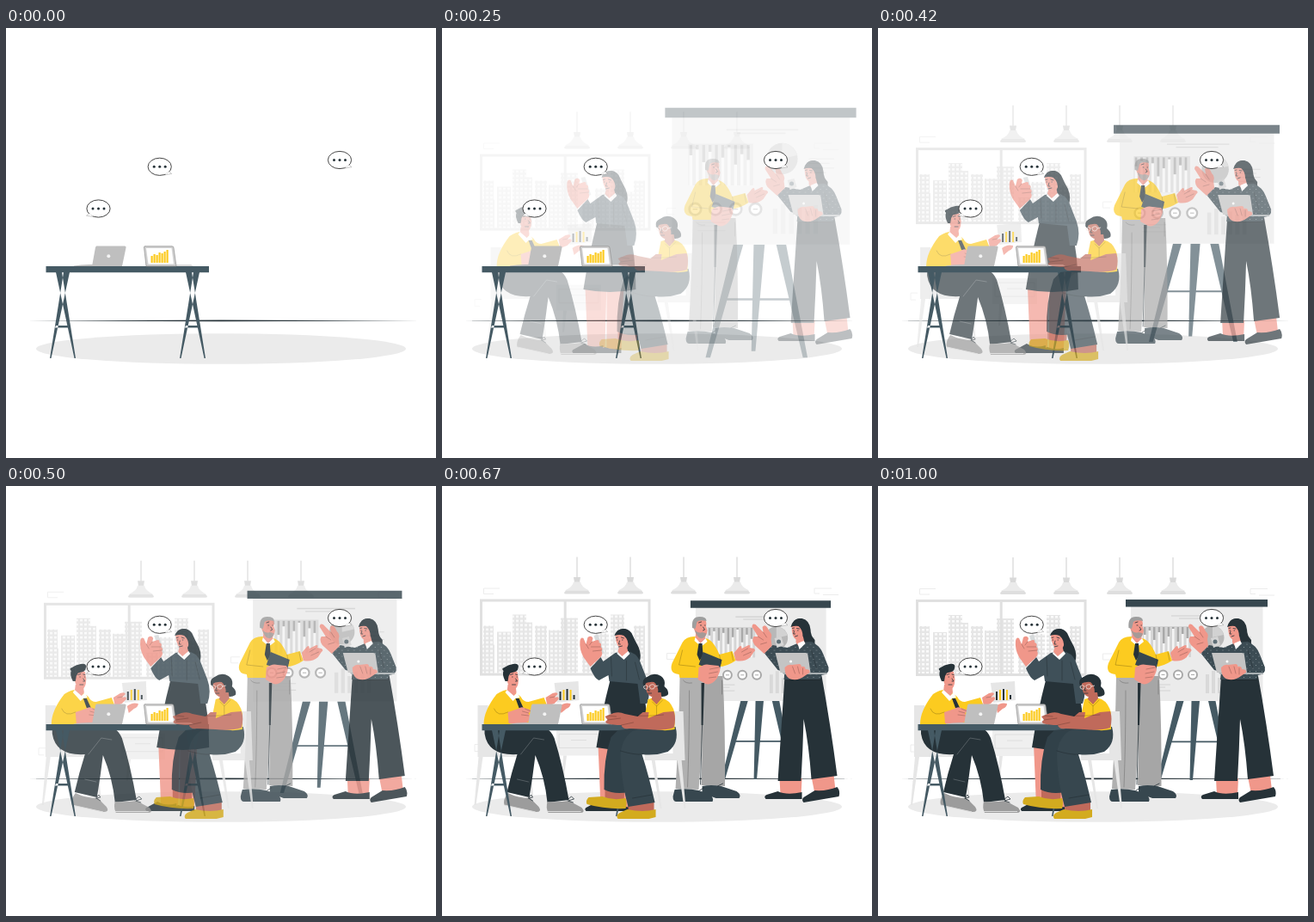
Write an HTML page that moves like this. It is 500 px wide and 500 px high and loops after 1.04 s.

```html
<!DOCTYPE html>
<html lang="en">
<head>
<meta charset="utf-8">
<title>Team meeting</title>
<style>
html, body { margin: 0; width: 100%; height: 100%; overflow: hidden; background: #fff; }
svg { display: block; width: 100vw; height: 100vh; }
.skin { fill: #f0978a; }
.brown { fill: #c06a5b; }
.yellow { fill: #fccb20; }
.gold { fill: #d3ab1f; }
.dark { fill: #263238; }
.slate { fill: #37474f; }
.steel { fill: #455a64; }
.pale { fill: #e6e6e6; }
.white { fill: #fff; }
.line { fill: none; stroke: #263238; stroke-width: .8; stroke-linecap: round; stroke-linejoin: round; }
.soft { fill: none; stroke: #000; stroke-opacity: .3; stroke-width: .7; stroke-linecap: round; stroke-linejoin: round; }
.faint { fill: none; stroke: #ececec; }
</style>
</head>
<body>
<svg viewBox="0 0 500 500">
<defs>
  <pattern id="panes" width="5" height="5" patternUnits="userSpaceOnUse">
    <path d="M0 0H5V5H0Z" fill="#e6e6e6"/><path d="M1 1h3v2.600H1Z" fill="#fafafa"/>
  </pattern>
  <pattern id="dots" width="7" height="7" patternUnits="userSpaceOnUse">
    <path d="M0 0H7V7H0Z" fill="#3c4c54"/><circle cx="2" cy="2" r=".5" fill="#9aa6ac"/><circle cx="5.500" cy="5.500" r=".5" fill="#9aa6ac"/>
  </pattern>
  <g id="lamp">
    <path d="M-.8 83h1.600v24h-1.600Z" fill="#e0e0e0"/>
    <path d="M-4 106.500h8l-1 6h-6Z" fill="#d9d9d9"/>
    <path d="M-4 112h8q1 6 10 10h-28q9-4 10-10Z" fill="#ebebeb"/>
    <path d="M-13 122h26l2 2.500q0 1.500-2 1.500h-26q-2 0-2-1.500Z" fill="#dedede"/>
  </g>
  <g id="trestle" class="steel">
    <path d="M58 284h7L81 384h-1.500ZM74 284h-7L51 384h1.500ZM58 346h15v2.500H57Z"/>
  </g>
  <g id="bubble">
    <path d="M5.500 9.600q4.500-.7 8.500-1.400l-3-2.500" fill="#fff" stroke="#999" stroke-width=".5"/>
    <ellipse rx="13.600" ry="10.100" fill="#fff" stroke="#333" stroke-width=".9"/>
    <path d="M5.500 8.700L10.800 5.700 11.500 7 8 8.800Z" fill="#fff"/>
    <g class="dark"><circle cx="-6.500" r="1.500"/><circle r="1.500"/><circle cx="6.500" r="1.500"/></g>
  </g>
</defs>

<ellipse cx="250" cy="373" rx="215" ry="17.800" fill="#ebebeb"/>

<g data-move="up">
  <rect x="45.500" y="133.500" width="195.500" height="86" fill="#fff"/>
  <g id="city" fill="url(#panes)"></g>
  <rect x="45.500" y="133.500" width="195.500" height="86" fill="none" stroke="#e0e0e0" stroke-width="3"/>
  <path d="M141.700 133h3v87h-3Z" fill="#e0e0e0"/>
  <use href="#lamp" x="157"/><use href="#lamp" x="219"/><use href="#lamp" x="281"/><use href="#lamp" x="343"/>
  <path class="faint" d="M67 119.500H48.500V126H60M453 119.500H433V125.500h6M443 127h18M272 195H261.500v7H270M46 301H38v8h6"/>
  <path d="M133 284h52v30h-52Z" fill="#efefef"/>
  <path d="M136 289h46v16h-46ZM150 296h18" fill="none" stroke="#dedede"/>
  <path d="M141 314h4l-3 25h-2Z" fill="#e6e6e6"/>
</g>

<path class="dark" d="M25 340.400L250 339.400 480 340.400 250 341.200Z"/>

<g data-move="zoom">
  <path class="steel" d="M347 250h8.500L327 347.700h-4ZM364.500 250h9.500l-8 92h-3.500ZM384 250h8.500L411 347.700h-4ZM340 296.500h59v1.800H340Z"/>
  <path d="M294 140H447.500V250H294Z" fill="#ebebeb"/>
  <path class="slate" d="M288 132H453v8.500H288Z"/>
  <path d="M341 151h62M350 154h42" stroke="#cfcfcf" stroke-width="1.200"/>
  <path d="M308 163h56v36h-56Z" fill="#d5d5d5"/>
  <g id="bars"></g>
  <g id="rings" fill="#fff" stroke="#a8a8a8" stroke-width="2"></g>
  <circle cx="389" cy="176" r="13.500" fill="#b8b8b8"/>
  <path d="M389 176V162.500A13.500 13.500 0 0 1 402 173Z" fill="#d2d2d2"/>
  <path d="M412 176h22M412 180h18M412 184h22M412 188h15M316 231h24M316 234h18M316 238h24" stroke="#d3d3d3"/>
  <path d="M381 219h4v22h-4ZM388 215h4v26h-4ZM395 223h4v18h-4ZM402 218h4v23h-4ZM409 221h4v20h-4ZM416 216h4v25h-4Z" fill="#d9d9d9"/>
</g>

<!-- presenter in yellow -->
<g data-move="right">
  <path d="M302 221h25q3 60 2.500 128l-27.500-1q2-60 0-127Z" fill="#a6a6a6"/>
  <path d="M277 221h28q-1 70-6 132l-27-1q4-64 5-131Z" fill="#b0b0b0"/>
  <path class="dark" d="M302 229h3.500l-1.500 49h-2Z"/>
  <path class="line" d="M303 277l-2 70"/>
  <path class="soft" d="M281 226q3 4 10 3M326 226v16M288 238q0 60-2 112"/>
  <path class="slate" d="M271 353q14-2 28 1l13 5q5 4 3 8h-42q-4 0-4-6ZM303 349q10-2 22 0l18 6q6 4 3 8h-27l-16-6Z"/>
  <path class="line" d="M300 354l5-3M321 349l6-3"/>
  <path class="yellow" d="M294 175l13 2q9 2 16 19l15-4 4 11q-12 8-22 7l-3 13H277L276 219Q264 218 268 206L280 182Q284 175 294 175Z"/>
  <path class="skin" d="M296 167l9 3 2 9-6 7-6-9Z"/>
  <path class="skin" d="M292 160Q296 152 304 153 309 156 307.500 163L309 168Q308 177 302 177 294 174 292 160Z"/>
  <path d="M291.500 165Q290 152 300 152 308 152 308 157 300 155 297 158L295 166Z" fill="#9e9e9e"/>
  <path d="M294.500 167Q298 172 303 170L308 171.500Q306 178 301 177 296 175 294.500 167Z" fill="#a59a97"/>
  <path class="line" d="M301 162h1M306 162h.5M299 159l3-1M304 164l2 3-2 1"/>
  <path class="white" d="M295 176l6 7 6-6 2 4-5 4-3 1-7-6Z"/>
  <path class="dark" d="M299 183h4l1 14-4 6-3-7Z"/>
  <path class="slate" d="M304 193l22 9-3 13-24-7Z"/>
  <path class="skin" d="M299 211q7-5 13-3l10 1q3 3 1 8l-3 7q-6 8-13 6l-9-5Z"/>
  <path class="skin" d="M340 194l6-7q3-3 3 2l8-4q3 0 1 3l5 1q3 2 0 4l-4 6q-7 6-17 4Z"/>
  <path class="soft" d="M280 191l-4 17 19 2M312 213l10-2M311 218l10-2M311 223l8-1M349 193l7-4M351 197l9-4M323 196l2 11M337 193l2 10"/>
</g>

<!-- colleague with laptop -->
<g data-move="right">
  <path class="dark" d="M408 160Q411 153 419 154 428 156 429 167 429 174 434 179 435 187 427 187 421 184 418 174Z"/>
  <path class="skin" d="M393 340h26l-1 20h-24ZM430 338l26-2 2 18-24 4Z"/>
  <path class="dark" d="M399 221h43q10 55 18 116l-30 4q-3-41-9-70-1 36-3 72h-27q4-62 8-122Z"/>
  <path class="dark" d="M391 355q10 5 28 1v8h-42q-3-3 1-5ZM434 354q14 1 26-4 4 5 2 11l-41 7q-3-3 0-6Z"/>
  <path d="M385 185l17 3 14-6 14-1q10 4 14 15l6 15q1 8-8 9l-2 5h-42l1-9-8-2-16-20Z" fill="url(#dots)"/>
  <path class="skin" d="M412 174h8l2 8-7 4-3-4Z"/>
  <path class="skin" d="M407 163Q412 157 418 162L421 173Q418 180 413 179 407 177 407 163Z"/>
  <path class="dark" d="M406 164Q409 153 418 154 428 158 425 174L420 175Q420 167 415 163 411 162 406 164Z"/>
  <path class="line" d="M409 168h.6M414 168h.6M408 165.500l2-.5M413 165.500l3 .5M410 169l-1 3 2 0M411 175l3-1"/>
  <path class="white" d="M414 183l7-3 2 3-7 7Z"/>
  <path d="M387 177l8-2 3 10-8 3Z" fill="#d5d5d5"/><circle cx="392" cy="181" r="2.500" fill="#5f6f77"/>
  <path class="skin" d="M375 195L364 185Q360 179 363 175L368 175 361 164Q361 159 365 161L374 170 373 164Q376 160 379 165L381 169Q385 172 383 178L384 186Z"/>
  <path class="soft" d="M368 175l6 4M374 170l4 6M371 184l7-2M430 191l6 21M405 226l36-1"/>
  <path d="M388 194h35q3 0 3 3l3 20h-35Z" fill="#c4c4c4"/>
  <path d="M396 217h52v2h-50Z" fill="#a9b0b3"/>
  <circle cx="406" cy="204" r="1.500" fill="#fff"/>
  <path class="skin" d="M399 211q4-4 8-3l9-1q3 1 2 3 5-1 5 3 6 0 5 4l-6 4q-6 5-14 4-9-1-9-14Z"/>
  <path class="soft" d="M408 210l3 8M414 210l2 8M420 212l0 7"/>
</g>

<!-- standing woman with phone -->
<g data-move="left">
  <path class="dark" d="M203 169Q213 162 220 171 224 180 228 187 232 197 229 205L213 200 209 180Z"/>
  <path class="skin" d="M181 300h25l-2 72h-20ZM206 300h20l-3 74h-17Z"/>
  <path class="dark" d="M180 367q10 6 22 2v7l-5 2h-30q-3-3 2-5ZM204 371q10 4 19 1v6h-27q-2-3 2-4Z"/>
  <path class="dark" d="M195 226h36q9 38 9 78-30 6-61 0 6-40 16-78Z"/>
  <path d="M184 199l3 5 14-10 14-2q10 2 14 10l9 23q5 14 0 28l-8 0-3-23-33-3-1-7-11 6q-5-2-10-14Z" fill="#3f5059"/>
  <path class="skin" d="M206 185h8l2 8-7 6-5-6Z"/>
  <path class="skin" d="M201 174Q207 168 213 173L217 181Q216 191 209 190 202 187 201 174Z"/>
  <path class="dark" d="M200 174Q203 165 212 166 223 171 220 188L216 188Q217 179 211 174 206 172 200 174Z"/>
  <path class="line" d="M203 179h.6M209 179h.6M202 176.500l2-.5M208 176l3 1M206 180l-1 4 2 0M205 187l4-1"/>
  <path class="white" d="M204 193l5 5 7-6 2 3-7 7-8-7Z"/>
  <path d="M176 174l5-1 7 21-5 2Z" fill="#d7dadb"/>
  <path class="skin" d="M172 210L164 199Q159 190 160 180 161 175 164 177L167 184 169 176Q173 173 175 177L174 181 180 179Q183 179 182 182 186 183 184 187 187 189 185 192 187 195 184 199Z"/>
  <path class="soft" d="M167 184l3 5M174 181l-3 4M173 187h11M175 192l10-1M214 203v23M224 205l5 20M196 199l1 22"/>
</g>

<!-- seated man -->
<g data-move="right">
  <path class="pale" d="M42 255h12l6 47h46v13H42Z"/>
  <path class="pale" d="M43 315h5l-8 56h-2ZM98 315h4l5 50h-2Z"/>
  <path class="dark" d="M50 276h48q26 0 33 17 10 32 17 72l-25 3q-3-29-14-55-3 25-7 49l-26-6q5-22 12-44-34 2-38-24Z"/>
  <path class="soft" style="stroke:#fff" d="M92 312l15-19 12 2M88 341l13 3"/>
  <path d="M77 357q12 6 26 6l10 10q4 6-3 6l-37-8q-2-6 4-14ZM123 367q13 1 25-1l15 8q5 6-2 6h-37q-3-6-1-13Z" fill="#9c9c9c"/>
  <path d="M73 371l36 8M123 378.500h39" stroke="#ddd"/>
  <path class="line" d="M101 363l3-4 2 3-5 1 5 3M146 365l5-4 3 3-7 2 6 2"/>
  <path class="yellow" d="M64 242q9-6 18-5l10 8q3 6 9 6l18-5 4 10q-9 8-19 7v14H49q0-16 15-35Z"/>
  <path class="skin" d="M77 231h9l1 9-3 5-8-6Z"/>
  <path class="skin" d="M75 218Q82 213 88 216L89.500 225Q89 236 84 236.500 76 235 75 218Z"/>
  <path class="dark" d="M74 227Q70 219 72 215 69 212 73 211 77 208 83 207 91 206 89 212 89 216 80 217.500L78 221 77 227Z"/>
  <path class="line" d="M82 222h.6M87.500 222h.5M80 219.500l3-1M86 219l2 .5M86 224l2 3-2 0M82 231l4 0"/>
  <path class="white" d="M76 237l8 7 4-4 3 6-5 1-3 3-9-10Z"/>
  <path class="dark" d="M86 247h4l6 13-6-2Z"/>
  <path class="pale" d="M131 229l28-2 1 22-26 3Z"/>
  <path class="dark" d="M137 239h2v10h-2ZM145 236h2v13h-2ZM153 243h2v5h-2Z"/>
  <path class="yellow" d="M141 237h2v12h-2ZM149 237h2v12h-2Z"/>
  <path class="skin" d="M121 246l8-5q6-2 6 1l-4 4q6-2 5 2l-5 5-8 3ZM137 256q6-5 13-3 0 4-5 6l-6 5Z"/>
  <path class="skin" d="M77 263l12-4q4-3 7-1l7 2q1 3-2 4l2 4q0 7-8 8H78Z"/>
  <path class="soft" d="M61 259q4 10 16 4M94 262l7 2M93 266l8 1M104 262l-7-3M126 246l6-1"/>
</g>

<path class="steel" d="M46.500 277H236v7.300H46.500Z"/>
<use href="#trestle"/><use href="#trestle" x="151"/>
<path d="M79 276.500q10-2 23-1.500v2H79ZM105 253.500h33q2 0 1.500 2L135 277H100l4-22Z" fill="#bfbfbf"/>
<circle cx="119.300" cy="265.300" r="2" fill="#f4f4f4"/>
<path d="M163 275h52l3 2H163Z" fill="#dcdcdc"/>
<path d="M161 253.800h32q2 0 2 2L198 277H163L160.500 255Z" fill="#d0d0d0" stroke="#8f8f8f" stroke-width=".7"/>
<path d="M163 256h29.500L195 274.500H165.500Z" fill="#fff"/>
<g id="chart" class="yellow"></g>

<!-- seated woman -->
<g data-move="right">
  <path class="pale" d="M268 262h13l2 57h-47v-8h33Z"/>
  <path class="pale" d="M244 318h4l8 57h-2ZM274 318h5l5 57h-2Z"/>
  <path class="brown" d="M190 350h23l-1 16h-22ZM217 365h30v17h-30Z"/>
  <path class="gold" d="M187 361q12 5 27 2 2 6 0 12-24 1-45-5-2-4 2-8ZM216 376q18 4 33 0v9l-8 2h-36q-3-4 2-7Z"/>
  <path d="M205 284l35-4 20 2-32 28-11 46q-16 3-28-3-1-35 8-61Z" fill="#314149"/>
  <path class="slate" d="M241 280l31 0q5 19-9 29-15 5-30 3 8 25 15 56l-31 5q-8-28-9-58 0-20 14-30Z"/>
  <path class="yellow" d="M240 248q10-4 20 0 8 4 11 16l0 19q-15 3-31-2l-3-18Z"/>
  <path class="dark" d="M235 232Q232 225 239 222 247 216 255 221 261 225 259 233 265 238 263 243 257 247 250 243Z"/>
  <path class="brown" d="M246 240h9l1 7-6 7-6-6Z"/>
  <path class="brown" d="M237 229Q244 225 251 229L253 237Q250 245 244 245 237 243 237 229Z"/>
  <path class="dark" d="M234 231Q236 220 247 220 258 222 257 238L252 240Q252 232 247 228 241 227 234 231Z"/>
  <path d="M235 233q3-3 5 0 0 4-3 3-2 0-2-3M242 232q5-3 6 1-1 4-4 3-3-1-2-4M248 233l4-1" fill="none" stroke="#f5e2dc" stroke-width=".8"/>
  <path class="line" d="M241 234l-1 4 2 0M240 241l4 0"/>
  <path class="brown" d="M258 263l12-1q3 9 0 19-12 4-30 2l-22-1q-8 1-9-4-10 0-17-2-3-2 1-4l-3-4 10-4q7-2 13 1l15 3 6-5 7 0-1 7Z"/>
  <path class="soft" d="M228 267q8 1 30-1M193 272l15-2M209 278l14-3M193 267l10 1M245 251l5 5 7-7M250 256v10M208 308q16 5 26 4M222 363l23-4"/>
</g>

<use href="#bubble" transform="translate(107.500 210) scale(-1 1)"/>
<use href="#bubble" x="178.700" y="161.300"/>
<use href="#bubble" x="388" y="153.500"/>
</svg>
<script>
const fill = (id, items, draw) => document.getElementById(id).innerHTML = items.map(draw).join('');
const rect = (x, y, w, h, extra = '') => `<rect x="${x}" y="${y}" width="${w}" height="${h}" ${extra}/>`;

fill('city', [[47, 185, 14], [48, 163, 12], [64, 170, 16], [82, 150, 16], [97, 159, 8], [108, 163, 14], [124, 168, 14],
  [138, 154, 20], [163, 190, 14], [178, 172, 16], [196, 150, 16], [212, 176, 12], [223, 163, 13]],
  ([x, y, w]) => rect(x, y, w, 218 - y));
fill('bars', [26, 31, 20, 29, 16, 24, 33, 18, 27, 22],
  (h, i) => rect(309 + i * 5.5, 164, 2.6, 35, 'fill="#f4f4f4"') + rect(309 + i * 5.5, 164, 2.6, 35 - h, 'fill="#a9a9a9"'));
fill('rings', [314, 331.5, 349, 366], x => `<circle cx="${x}" cy="219.5" r="5"/><path d="M${x - 2} 219.500h4" stroke-width="1"/>`);
fill('chart', [8, 10, 9, 12, 11, 13, 15], (h, i) => rect(168.5 + i * 3, 273 - h, 2.2, h));

const FPS = 24, LOOP = 1040, SHIFT = 21;
const bezier = (a, b, s) => 3 * a * s * (1 - s) ** 2 + 3 * b * s * s * (1 - s) + s ** 3;

// Overshooting ease: solve x(s) = t by bisection, return y(s)
function ease(t) {
  let lo = 0, hi = 1;
  for (let i = 0; i < 30; i++) {
    const mid = (lo + hi) / 2;
    if (bezier(.36, .5, mid) < t) lo = mid; else hi = mid;
  }
  return bezier(-.01, 1.38, lo);
}

const moves = {
  up: d => `translate(0 ${SHIFT * d})`,
  right: d => `translate(${SHIFT * d} 0)`,
  left: d => `translate(${-SHIFT * d} 0)`,
  zoom: d => `translate(370.5 245) scale(${1 + d / 2}) translate(-370.5 -245)`
};
const groups = document.querySelectorAll('[data-move]');

function draw(now) {
  const step = Math.floor(now % LOOP * FPS / 1000 + .15);
  const p = step < 2 ? 0 : ease(Math.min(1, (step + 1) / FPS));
  for (const g of groups) {
    g.setAttribute('transform', moves[g.dataset.move](1 - p));
    g.setAttribute('opacity', Math.min(1, p));
  }
}

const start = performance.now();
function tick() {
  draw(performance.now() - start);
  requestAnimationFrame(tick);
}
tick();
</script>
</body>
</html>
```
